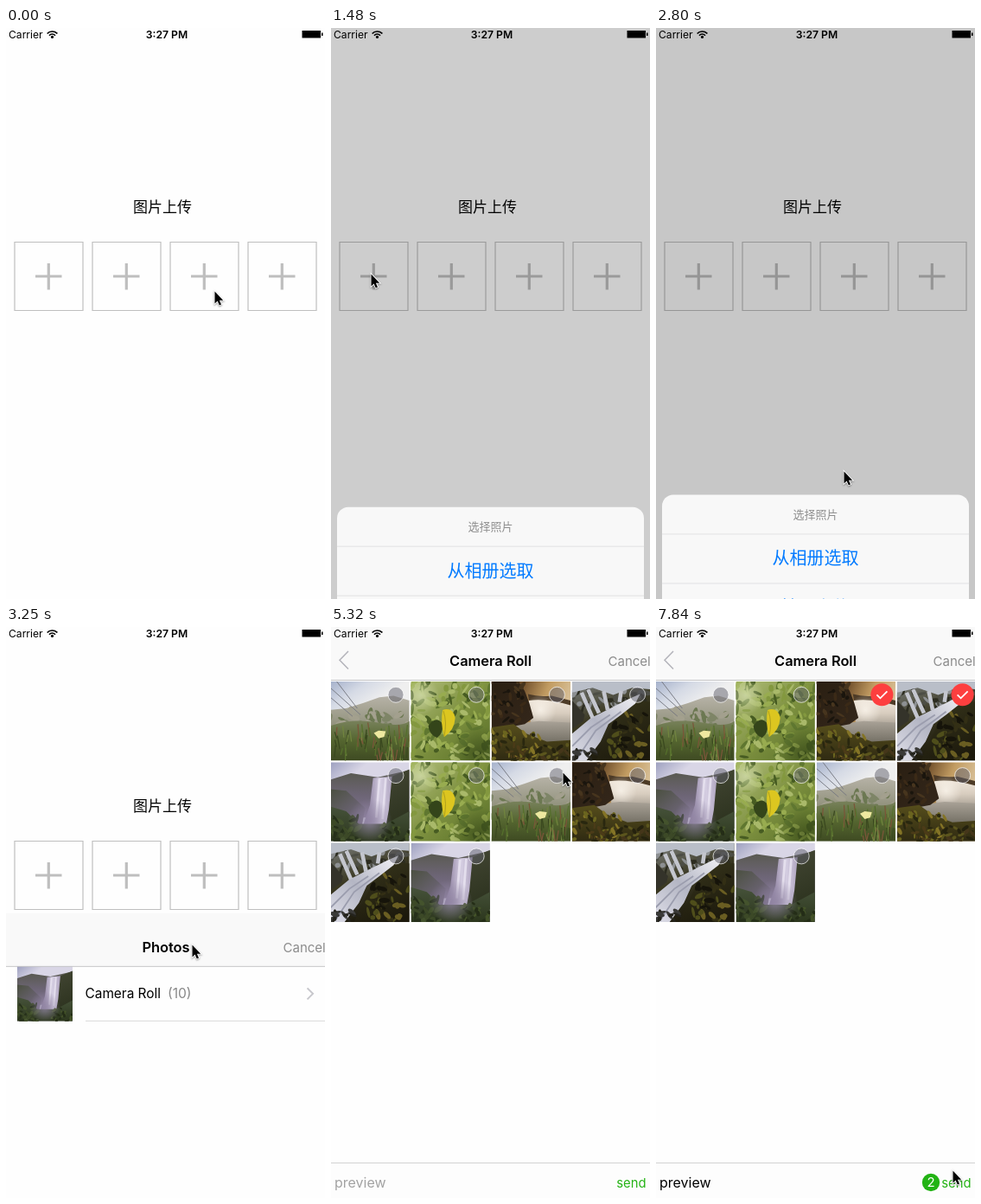
An HTML page with a canvas that plays this animation: 369 px wide and 660 px high, repeating every 7990 ms.

```html
<!DOCTYPE html>
<html lang="zh">
<head>
<meta charset="utf-8">
<title>图片上传</title>
<style>
html, body { margin: 0; width: 100%; height: 100%; overflow: hidden; background: #fff; }
canvas { display: block; width: 369px; height: 660px; }
</style>
</head>
<body>
<canvas></canvas>
<script>
const W = 369, H = 660, LOOP = 7990, STEP = 148;
const LATIN = 'Inter, Roboto, sans-serif';
const CJK = '"Noto Sans CJK SC", "Noto Sans CJK", sans-serif';
const canvas = document.querySelector('canvas'), c = canvas.getContext('2d');
const ratio = window.devicePixelRatio || 1;
canvas.width = W * ratio;
canvas.height = H * ratio;

const clamp = x => Math.max(0, Math.min(1, x));
const smooth = x => (x = clamp(x), x * x * (3 - 2 * x));
const easeOut = x => 1 - (1 - clamp(x)) ** 2;

// ---- drawing helpers ----
function rect(x, y, w, h, fill) {
  c.fillStyle = fill;
  c.fillRect(x, y, w, h);
}
function fill(d, color) {
  c.fillStyle = color;
  c.fill(new Path2D(d));
}
function line(d, color, width = 1) {
  c.strokeStyle = color;
  c.lineWidth = width;
  c.stroke(new Path2D(d));
}
function disc(x, y, r, color) {
  c.fillStyle = color;
  c.beginPath();
  c.arc(x, y, r, 0, 7);
  c.fill();
}
function text(s, x, y, font, color, align = 'left') {
  c.font = font;
  c.fillStyle = color;
  c.textAlign = align;
  c.fillText(s, x, y);
}
function stops(g, colors) {
  colors.forEach((color, i) => g.addColorStop(i / (colors.length - 1), color));
  return g;
}
function ramp(x1, y1, x2, y2, ...colors) {
  return stops(c.createLinearGradient(x1, y1, x2, y2), colors);
}
// Soft round patch of one colour, given as "r,g,b"
function glow(x, y, r, rgb, alpha) {
  disc(x, y, r, stops(c.createRadialGradient(x, y, 0, x, y, r), [`rgba(${rgb},${alpha})`, `rgba(${rgb},0)`]));
}
function layer(x, y, alpha, draw) {
  c.save();
  c.translate(x, y);
  c.globalAlpha *= alpha;
  draw();
  c.restore();
}
function random(seed) {
  return () => (seed = seed * 16807 % 2147483647) / 2147483647;
}
// Scatter small leaves or stones of mixed colours over an area
function scatter(seed, n, x, y, w, h, size, colors) {
  const rnd = random(seed);
  for (let i = 0; i < n; i++) {
    c.fillStyle = colors[i % colors.length];
    c.beginPath();
    c.ellipse(x + rnd() * w, y + rnd() * h, size * (.5 + rnd()), size * (.25 + rnd() * .4), rnd() * 3, 0, 7);
    c.fill();
  }
}

// ---- pictures, each on a 100 x 100 field ----
function meadow() {
  rect(0, 0, 100, 100, ramp(0, 0, 30, 45, '#a5b1cb', '#d5dae5', '#efefef'));
  fill('M0 36L20 34L42 27L62 20L80 18L100 24V70H0Z', ramp(0, 20, 0, 60, '#b5b1a5', '#8d8e78'));
  scatter(3, 26, 0, 38, 100, 18, 6, ['#7e8567', '#a3a08e', '#6c7852']);
  line('M0 8L38 42M0 20L28 44M8 0L34 34', '#74767f', 1);
  fill('M0 56Q30 46 60 52T100 50V100H0Z', ramp(0, 50, 0, 100, '#77815a', '#54652f', '#3e4a22'));
  const rnd = random(7), tones = ['#71843f', '#3a481f', '#7a5639', '#55702c'];
  for (let i = 0; i < 80; i++) {
    const x = rnd() * 100, y = 68 + rnd() * 36;
    line(`M${x} ${y}l${rnd() * 6 - 3} ${-8 - rnd() * 10}`, tones[i % 4], 1.4);
  }
  fill('M55 65L61 62L70 63L68 70L61 72Z', '#eee9a0');
}
function leaves() {
  rect(0, 0, 100, 100, ramp(0, 0, 100, 100, '#b3bf7c', '#7e9140', '#566d26'));
  scatter(31, 150, 0, 0, 100, 100, 5.5, ['#98ac50', '#5f7730', '#83983f', '#475c22', '#a9b96a']);
  glow(12, 18, 24, '222,230,190', .6);
  glow(85, 90, 34, '45,60,20', .5);
  fill('M22 56Q32 42 40 54Q41 66 33 71Q23 67 22 56Z', '#34451a');
  fill('M40 36Q53 32 56 46Q55 62 42 70Q37 52 40 36Z', '#dcc620');
  line('M41 37Q46 52 42 69', '#aa9c1b', 1);
}
function sunset() {
  rect(0, 0, 100, 100, ramp(40, 0, 100, 24, '#6e4d2a', '#c29c62', '#d9c29b'));
  fill('M46 16Q60 20 76 18L100 24V40H50Z', '#4d3b27');
  fill('M47 24Q70 21 100 30V58H50Z', ramp(0, 22, 0, 58, '#efe6da', '#d8cdbf', '#a39b8f'));
  glow(62, 36, 20, '255,250,242', .7);
  fill('M28 54L60 50L100 52V84H38Z', ramp(0, 50, 0, 80, '#a9a297', '#6f6b60'));
  fill('M0 0H34L42 12L48 28L53 46L42 54L0 62Z', ramp(0, 0, 50, 50, '#2a1f12', '#33261a'));
  fill('M0 58L28 54L44 66L70 76L100 74V100H0Z', ramp(0, 56, 0, 100, '#544c1b', '#2f2a12'));
  scatter(11, 36, 0, 0, 42, 52, 4, ['#3b2a17', '#1a150d', '#47351e']);
  scatter(23, 60, 0, 62, 62, 40, 4, ['#6b651f', '#29270f', '#847426', '#4b3b18']);
  scatter(5, 24, 58, 80, 44, 22, 4, ['#5b551d', '#25220e', '#45361a']);
}
function cascade() {
  rect(0, 0, 100, 100, ramp(0, 0, 40, 100, '#7e8180', '#3a3822', '#1c190c'));
  scatter(17, 34, 0, 8, 95, 30, 6, ['#4d4e46', '#8d9092', '#2c2c20']);
  fill('M0 0H100V10L76 8L52 17L26 8L0 14Z', '#b9bec8');
  fill('M56 44L82 24L100 26V100H30L44 70Z', ramp(50, 30, 80, 100, '#34321a', '#1c190c'));
  scatter(29, 44, 48, 34, 52, 66, 5, ['#4f4e1b', '#16140a', '#6a5e22', '#332f15']);
  fill('M0 66L24 46L44 36L72 22L86 16L80 28L62 42L46 54L36 76L18 100H0Z',
    ramp(0, 100, 80, 20, '#dedee8', '#b4b6c4', '#eeeef3'));
  line('M0 82L24 58L48 42M6 98L30 62L62 38', '#9b9dae', 2);
  line('M12 14L26 46M40 12L45 36M62 12L60 26M20 10L34 40', '#c4c6ce', 5);
  fill('M0 24L16 42L14 50L0 60Z', '#34332a');
  scatter(37, 10, 0, 84, 40, 18, 5, ['#3a3a38', '#24231c']);
}
function waterfall() {
  rect(0, 0, 100, 100, ramp(0, 0, 20, 24, '#9da0bf', '#d9d6e6'));
  fill('M0 22L26 14L60 19L100 10V70H0Z', ramp(0, 14, 0, 70, '#5a5a52', '#6d6576', '#80748f'));
  fill('M0 34L20 36L44 58L40 80H0Z', ramp(0, 34, 30, 70, '#4b5040', '#6f667a'));
  fill('M54 20L80 18L76 58L72 82L40 84L50 54Z', ramp(46, 0, 82, 0, '#8d809f', '#d5cee2', '#a498b5'));
  line('M62 21L58 70M70 20L66 72', 'rgba(240,235,247,.7)', 3);
  fill('M78 18L100 9V84L70 82L74 60Z', ramp(74, 20, 100, 80, '#3f4330', '#2b311d'));
  fill('M0 56L20 62L36 78L70 78L100 62V100H0Z', ramp(0, 56, 0, 100, '#46523a', '#2c371d'));
  scatter(41, 34, 0, 66, 36, 36, 5, ['#44532d', '#26301a', '#3c4927']);
  scatter(43, 26, 64, 76, 36, 26, 4, ['#445329', '#242d17']);
  glow(50, 74, 28, '146,134,164', .85);
}
function photo(draw, x, y, size) {
  c.save();
  c.translate(x, y);
  c.scale(size / 100, size / 100);
  c.beginPath();
  c.rect(0, 0, 100, 100);
  c.clip();
  draw();
  c.restore();
}
const album = [meadow, leaves, sunset, cascade, waterfall, leaves, meadow, sunset, cascade, waterfall];

// ---- screens ----
function statusBar() {
  text('Carrier', 3, 11.5, `12.1px ${LATIN}`, '#000');
  text('3:27 PM', 186, 11.5, `600 12.2px ${LATIN}`, '#000', 'center');
  disc(53.5, 10.4, 1.6, '#000');
  for (const r of [4.8, 8]) {
    c.beginPath();
    c.arc(53.5, 12, r, -Math.PI * .76, -Math.PI * .24);
    c.strokeStyle = '#000';
    c.lineWidth = 1.7;
    c.stroke();
  }
  rect(342.5, 3, 21.5, 8.5, '#000');
  rect(365, 5.5, 1.5, 3.5, '#000');
}

function home() {
  rect(0, 0, W, H, '#fefefe');
  text('图片上传', 181, 213.4, `17px ${CJK}`, '#000', 'center');
  for (let i = 0; i < 4; i++) {
    const x = 10 + 90 * i;
    line(`M${x} 247.5h79v79h-79z`, '#bfbfbf', 1.2);
    line(`M${x + 24} 287h30.5M${x + 39.3} 272v30.5`, '#bebebe', 3.2);
  }
}

function actionSheet(shown) {
  rect(0, 0, W, H, `rgba(0,0,0,${.4 * shown})`);
  layer(0, H - 222 * shown, 1, () => {
    c.fillStyle = '#f8f8f8';
    c.beginPath();
    c.roundRect(7, 0, 355, 216, 13);
    c.fill();
    line('M7 45.5h355M7 102.5h355M7 159.5h355', '#e1e1e3');
    text('选择照片', 184.5, 27.7, `13px ${CJK}`, '#8f8f8f', 'center');
    ['从相册选取', '拍照上传', '取消'].forEach((label, i) =>
      text(label, 184.5, 81 + 57 * i, `20px ${CJK}`, i < 2 ? '#007aff' : '#ff3b30', 'center'));
  });
}

function albumList(pressed) {
  rect(0, 0, W, H, '#fefefe');
  if (pressed) rect(0, 61, W + 110, 64, '#d5d5d5');
  photo(waterfall, 13, 61, 64);
  text('Camera Roll', 91.5, 98, `15.4px ${LATIN}`, '#000');
  text('(10)', 187, 98, `15.6px ${LATIN}`, '#888');
  line('M92 124.5H369', '#d9d9d9');
  line('M348.5 86.5l6.5 6.5l-6.5 6.5', '#c7c7cc', 2);
}

// Size of a tapped mark: 0 before the tap, then a short bounce to 1
function pop(time, tap) {
  const d = (time - tap) / 450;
  return d < 0 ? 0 : d < 1 ? 1 + .15 * (1 - d) * Math.cos(7 * d) : 1;
}

function mark(x, y, size) {
  if (!size) {
    disc(x, y, 9, 'rgba(95,95,108,.5)');
    c.strokeStyle = 'rgba(255,255,255,.7)';
    c.lineWidth = 1;
    c.stroke();
    return;
  }
  c.save();
  c.translate(x, y);
  c.scale(size, size);
  disc(0, 0, 13, '#fd3f3f');
  line('M-6 0L-2 4L6 -4', '#fff', 1.8);
  c.restore();
}

function photoGrid(time) {
  const loaded = time >= 5020, first = pop(time, 6050), second = pop(time, 7240);
  rect(0, 0, W, H, loaded ? '#fefefe' : '#fafafa');
  if (loaded) album.forEach((draw, i) => {
    const x = -.7 + i % 4 * 93.2, y = 63 + (i >> 2) * 93.3;
    photo(draw, x, y, 91.4);
    mark(x + 75.7, y + 15.3, i === 2 ? first : i === 3 ? second : 0);
  });
  rect(0, 619, W, 41, loaded ? '#fdfdfd' : '#fafafa');
  line('M0 619.5H369', '#d2d2d2');
  text('preview', 4, 648, `16px ${LATIN}`, first ? '#000' : '#a2a2a2');
  text('send', 330.3, 648, `14.8px ${LATIN}`, '#25b315');
  if (first) {
    layer(318, 642, 1, () => {
      const size = second || first;
      c.scale(size, size);
      disc(0, 0, 10.2, '#22b314');
      text(second ? '2' : '1', 0, 5.4, `15px ${LATIN}`, '#fff', 'center');
    });
  }
}

function picker(time) {
  const push = smooth((time - 4446) / 430);
  if (push < 1) {
    layer(-113 * push, 0, 1, () => albumList(time >= 4440));
    rect(0, 0, W, H, `rgba(0,0,0,${.08 * push})`);
  }
  if (push > 0) {
    const x = W * (1 - push);
    rect(x - 9, 61, 9, H, ramp(x - 9, 0, x, 0, 'rgba(0,0,0,0)', `rgba(0,0,0,${.22 * (1 - push)})`));
    layer(x, 0, 1, () => photoGrid(time));
  }
  rect(0, 0, W, 61, '#f9f9f9');
  line('M0 61.5H369', '#c4c4c6');
  const title = `600 16.4px ${LATIN}`;
  layer(-95 * push, 0, clamp(1 - 2 * push), () => text('Photos', 185, 45, title, '#000', 'center'));
  layer(130 * (1 - push), 0, clamp(2 * push - 1), () => text('Camera Roll', 184.5, 45, title, '#000', 'center'));
  layer(0, 0, Math.max(push, 1 - push), () => text('Cancel', 320.5, 44.7, `15px ${LATIN}`, '#8c8c8c'));
  layer(0, 0, push, () => line('M20 28L10 38.3L20 48.5', '#b3b3ba', 1.5));
}

// ---- pointer: time, x, y ----
const route = [
  [0, 241, 304], [148, 239, 310], [296, 220, 324], [444, 172, 328], [592, 104, 311], [740, 58, 288], [888, 46, 284],
  [1628, 46, 284], [1924, 105, 370], [2220, 200, 495], [2368, 217, 512],
  [2960, 217, 512], [3256, 215, 367], [3552, 203, 190], [3700, 196, 140], [4144, 172, 84], [4440, 169, 77],
  [4884, 169, 77], [5032, 195, 105], [5328, 268, 168], [5624, 266, 96], [5900, 260, 75],
  [6350, 260, 75], [6650, 318, 74], [6940, 351, 75],
  [7252, 351, 75], [7400, 350, 180], [7700, 345, 560], [7844, 343, 628], [LOOP, 343, 628]
];
function pointer(time) {
  const i = Math.max(1, route.findIndex(p => p[0] >= time));
  const [t1, x1, y1] = route[i - 1], [t2, x2, y2] = route[i];
  const f = clamp((time - t1) / (t2 - t1));
  layer(x1 + (x2 - x1) * f, y1 + (y2 - y1) * f, 1, () => {
    const arrow = 'M.5 .5V14.4L3.6 11.5L5.8 16.4L8 15.4L5.9 10.7H10.2Z';
    c.shadowColor = 'rgba(0,0,0,.4)';
    c.shadowBlur = 2 * ratio;
    c.shadowOffsetY = ratio;
    line(arrow, '#fff', 1.8);
    c.shadowColor = 'transparent';
    fill(arrow, '#000');
  });
}

function draw(time) {
  c.setTransform(ratio, 0, 0, ratio, 0, 0);
  home();
  const sheet = smooth((time - 1342) / 284) - smooth((time - 2680) / 280);
  if (sheet > 0) actionSheet(sheet);
  const rise = easeOut((time - 3110) / 500);
  if (rise > 0) layer(0, H * (1 - rise), 1, () => picker(time));
  statusBar();
  pointer(time);
}

// The screen refreshes in steps, like a slow screen recording
const start = performance.now();
let shown = -1;
function tick() {
  const t = (performance.now() - start) % LOOP;
  const time = Math.min(LOOP, Math.floor((t + 20) / STEP) * STEP);
  if (time !== shown) draw(shown = time);
  requestAnimationFrame(tick);
}
tick();
</script>
</body>
</html>
```
